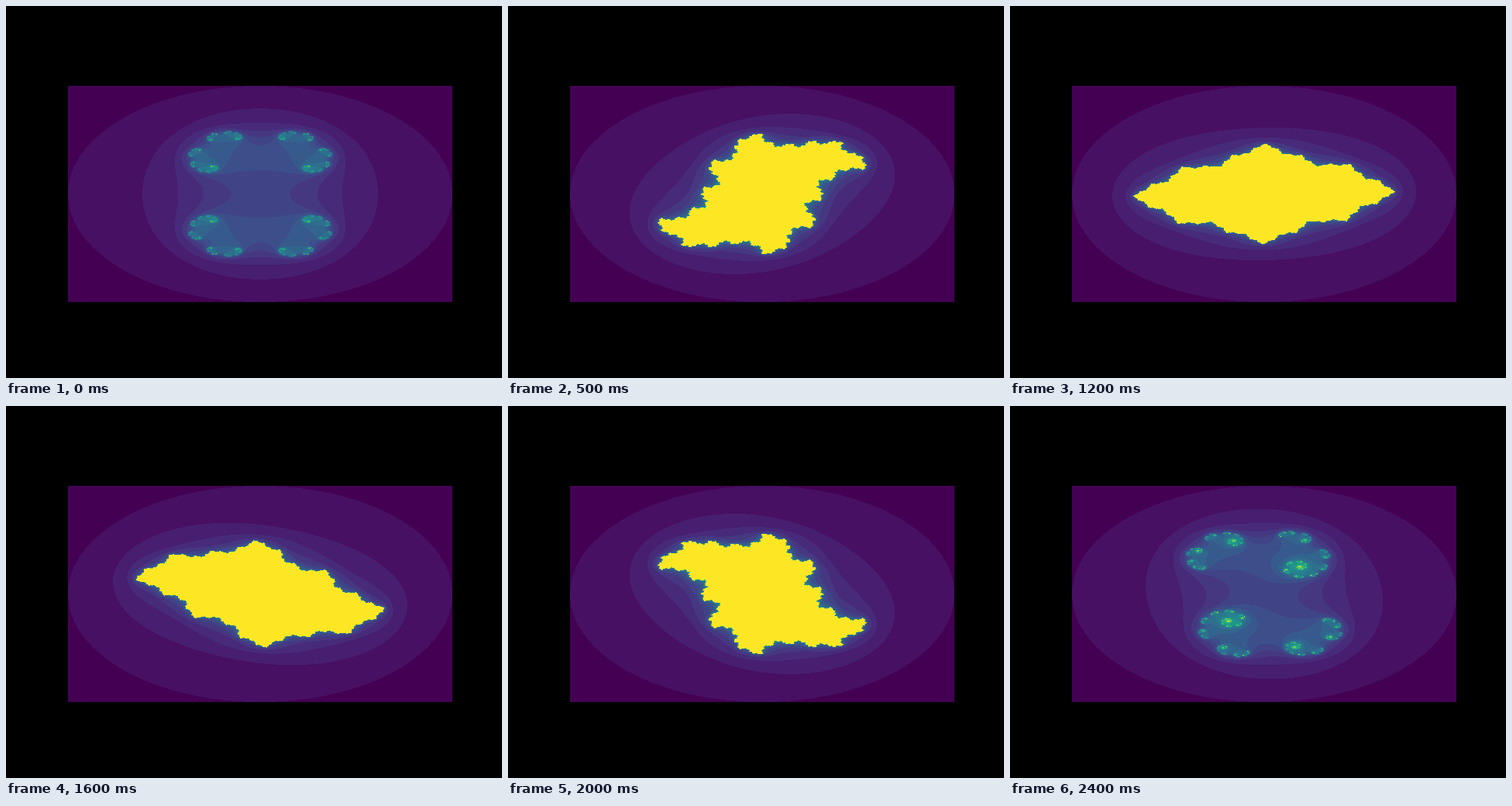
These frames come from a looping animation (640 px wide and 480 px high, 2.5 s). An HTML page with a canvas:

```html
<!DOCTYPE html>
<html lang="en">
<head>
<meta charset="utf-8">
<title>Julia sets</title>
<style>
html, body { margin: 0; width: 100%; height: 100%; overflow: hidden; background: #000; }
canvas { display: block; }
</style>
</head>
<body>
<canvas id="stage" width="640" height="480"></canvas>
<script>
const ctx = document.getElementById('stage').getContext('2d');
const LEFT = 80, TOP = 103, W = 496, H = 279;
const STEPS = 25, STEP_MS = 100;
const RADIUS = 0.5, MAX_ITER = 25;

// Viridis at evenly spaced stops
const STOPS = ('440154 481568 482677 453781 3f4788 39558c 32648e 2d718e 287d8e 238a8d ' +
  '1f968b 20a386 29af7f 3cbc75 56c667 74d055 94d840 b8de29 dce318 fde725')
  .split(' ').map(h => [0, 2, 4].map(i => parseInt(h.substr(i, 2), 16)));

function viridis(t) {
  const p = t * (STOPS.length - 1);
  const i = Math.min(Math.floor(p), STOPS.length - 2);
  return STOPS[i].map((v, k) => Math.round(v + (STOPS[i + 1][k] - v) * (p - i)));
}

const palette = Array.from({ length: MAX_ITER + 1 }, (_, n) => viridis(n / MAX_ITER));

function escapeTime(x, y, cx, cy) {
  let n = 0;
  while (n < MAX_ITER && x * x + y * y <= 4) {
    const t = x * x - y * y + cx;
    y = 2 * x * y + cy;
    x = t;
    n++;
  }
  return n;
}

function julia(step) {
  const a = 2 * Math.PI * step / STEPS;
  const cx = RADIUS * Math.cos(a), cy = RADIUS * Math.sin(a);
  const img = ctx.createImageData(W, H);
  let o = 0;
  for (let j = 0; j < H; j++) {
    const y = -2 + 4 * (j + 0.5) / H;
    for (let i = 0; i < W; i++) {
      const x = -2 + 4 * (i + 0.5) / W;
      const [r, g, b] = palette[escapeTime(x, y, cx, cy)];
      img.data[o++] = r;
      img.data[o++] = g;
      img.data[o++] = b;
      img.data[o++] = 255;
    }
  }
  return img;
}

ctx.fillStyle = '#000';
ctx.fillRect(0, 0, 640, 480);

const cache = [];
let shown = -1;
const start = performance.now();

function draw() {
  const elapsed = Math.max(0, performance.now() - start);
  const step = Math.floor(elapsed / STEP_MS) % STEPS;
  if (step !== shown) {
    cache[step] = cache[step] || julia(step);
    ctx.putImageData(cache[step], LEFT, TOP);
    shown = step;
  }
  requestAnimationFrame(draw);
}
draw();
</script>
</body>
</html>
```
